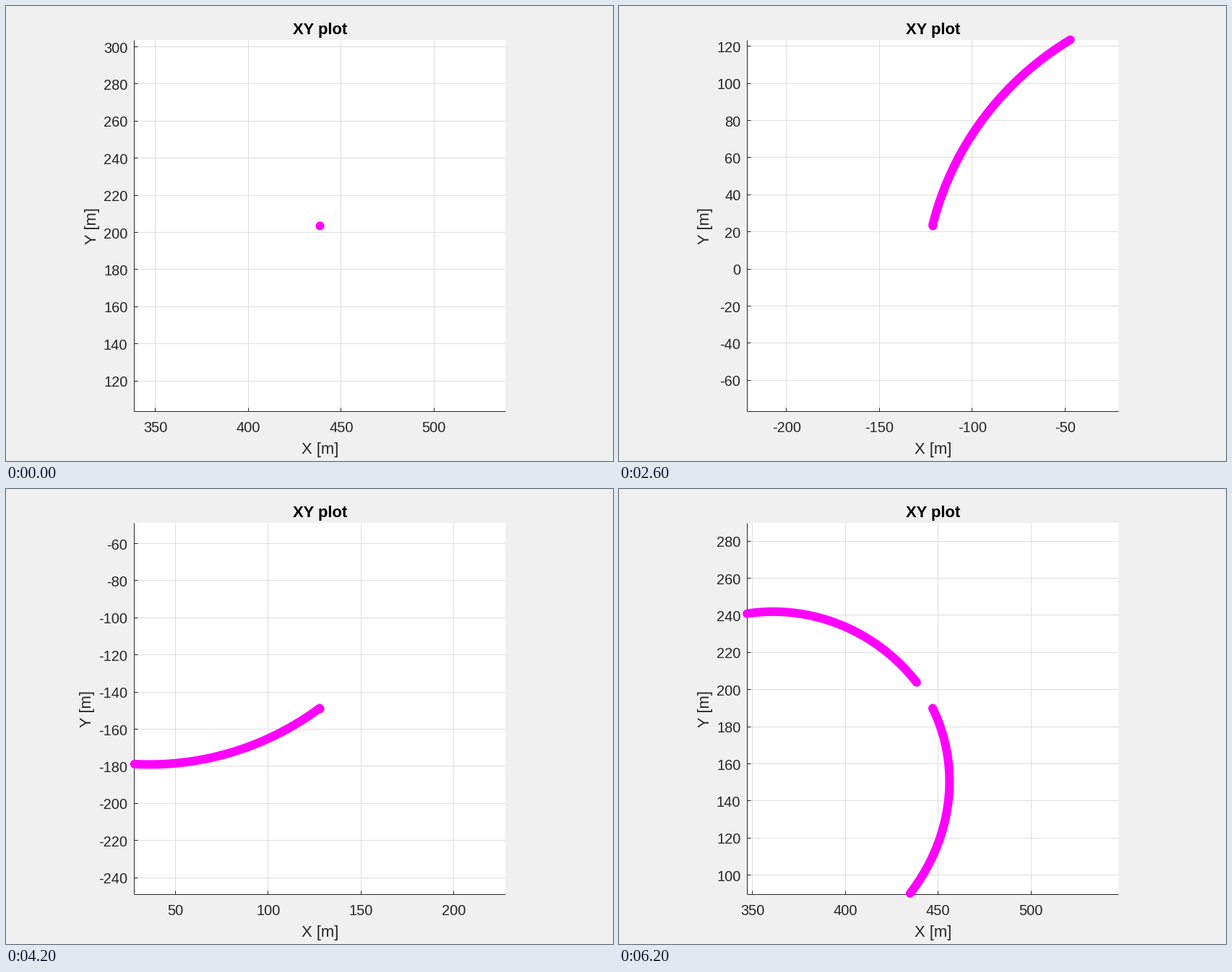
Recreate the animation shown at these times as a matplotlib script. Size 840 by 630 pixels, loop 6400 ms.

```python
import numpy as np
import matplotlib.pyplot as plt
from matplotlib.animation import FuncAnimation
from matplotlib.patches import Rectangle

W, H, DPI = 840, 630, 100
FRAMES, INTERVAL = 32, 200
LEFT, RIGHT, TOP, BOTTOM = 177, 691, 47, 561
MID_X, MID_Y = 434, 303.5
SCALE, REACH = 2.57, 100          # pixels per metre, half the view in metres
INK, GRID, TRAIL = "#262626", "#dedede", "#ff00ff"

# Ends of the track's bends and straights: frame, x, y (m), heading (deg)
POSES = [
    (0, 438.6, 203.7, 128),
    (1.74, 361.4, 241.8, 180),
    (2.29, 335, 238.2, 195.3),
    (5, 208.6, 203.7, 196),
    (9.53, -8, 140.5, 196.5),
    (13, -121.1, 23.4, 256),
    (18, -13, -171.1, 341.3),
    (21.04, 129.5, -147.7, 397.3),
    (24, 246.2, -58.7, 397.3),
    (28.29, 415.4, 70.5, 397.3),
    (31, 447.2, 189.8, 476),
]


def bend(start, end, u):
    """Near-circular Hermite curve between two poses."""
    (_, *p, a), (_, *q, b) = start, end
    p, q = np.array(p), np.array(q)
    a, b = np.radians([a, b])
    pull = np.hypot(*(q - p)) / np.cos((b - a) / 4) ** 2
    tan_p = pull * np.array([np.cos(a), np.sin(a)])
    tan_q = pull * np.array([np.cos(b), np.sin(b)])
    u = np.asarray(u)[:, None]
    return ((2 * u**3 - 3 * u**2 + 1) * p + (u**3 - 2 * u**2 + u) * tan_p
            + (3 * u**2 - 2 * u**3) * q + (u**3 - u**2) * tan_q)


def build_track(steps=400):
    """Track points and the frame time at which each one is reached."""
    points, times = [], []
    for start, end in zip(POSES, POSES[1:]):
        piece = bend(start, end, np.linspace(0, 1, steps))
        travel = np.append(0, np.cumsum(np.hypot(*np.diff(piece, axis=0).T)))
        points.append(piece)
        times.append(start[0] + (end[0] - start[0]) * travel / travel[-1])
    return np.vstack(points), np.concatenate(times)


track, track_time = build_track()


def px(size):
    return size * 72 / DPI


fig = plt.figure(figsize=(W / DPI, H / DPI), dpi=DPI, facecolor="#f0f0f0")
ax = fig.add_axes([0, 0, 1, 1])


def line(x, y, color, z):
    ax.plot(x, y, color=color, lw=px(1), zorder=z, solid_capstyle="butt")


def label(x, y, text, size=20, ha="center", **kw):
    style = dict(color=INK, family="Liberation Sans", fontsize=px(size),
                 ha=ha, va="baseline", zorder=3)
    ax.text(x, y, text, **{**style, **kw})


def ticks(center, step):
    first = int(np.ceil((center - REACH) / step)) * step
    return range(first, int(np.floor(center + REACH)) + 1, step)


def draw(frame):
    ax.clear()
    ax.set(xlim=(0, W), ylim=(H, 0))
    ax.axis("off")
    ax.add_patch(Rectangle((LEFT, TOP), RIGHT - LEFT, BOTTOM - TOP,
                           color="white", lw=0, zorder=0))

    head = np.array([np.interp(frame, track_time, c) for c in track.T])

    for value in ticks(head[0], 50):
        x = MID_X + (value - head[0]) * SCALE
        line([x, x], [TOP, BOTTOM], GRID, 1)
        line([x, x], [BOTTOM, BOTTOM - 5], INK, 2)
        label(x + 0.5, 590, str(value))

    y_values = ticks(head[1], 20)
    for value in y_values:
        y = MID_Y - (value - head[1]) * SCALE
        line([LEFT, RIGHT], [y, y], GRID, 1)
        line([LEFT, LEFT + 5], [y, y], INK, 2)
        label(168.5, y + 8.5, str(value), ha="right")

    line([LEFT, LEFT], [TOP, BOTTOM], INK, 2)
    line([LEFT, RIGHT], [BOTTOM, BOTTOM], INK, 2)

    # The rotated label makes room for the widest tick label
    widest = max(len(str(v)) for v in y_values)
    label(434.5, 39, "XY plot", 22, color="black", weight="bold")
    label(434.5, 620, "X [m]", 22)
    label(125 - 7 * (widest - 3), 304, "Y [m]", 22,
          rotation=90, rotation_mode="anchor")

    trail = np.vstack([track[track_time < frame], head])
    trail[np.abs(trail - head).max(axis=1) > REACH] = np.nan
    x, y = (trail - head).T * SCALE
    ax.plot(MID_X + x, MID_Y - y, color=TRAIL, lw=px(12), zorder=4,
            solid_capstyle="round", solid_joinstyle="round")
    ax.plot(MID_X, MID_Y, "o", color=TRAIL, ms=px(12), mew=0, zorder=4)
    return []


anim = FuncAnimation(fig, draw, frames=FRAMES, interval=INTERVAL,
                     init_func=lambda: [], repeat=True, repeat_delay=0)
plt.show()
```
